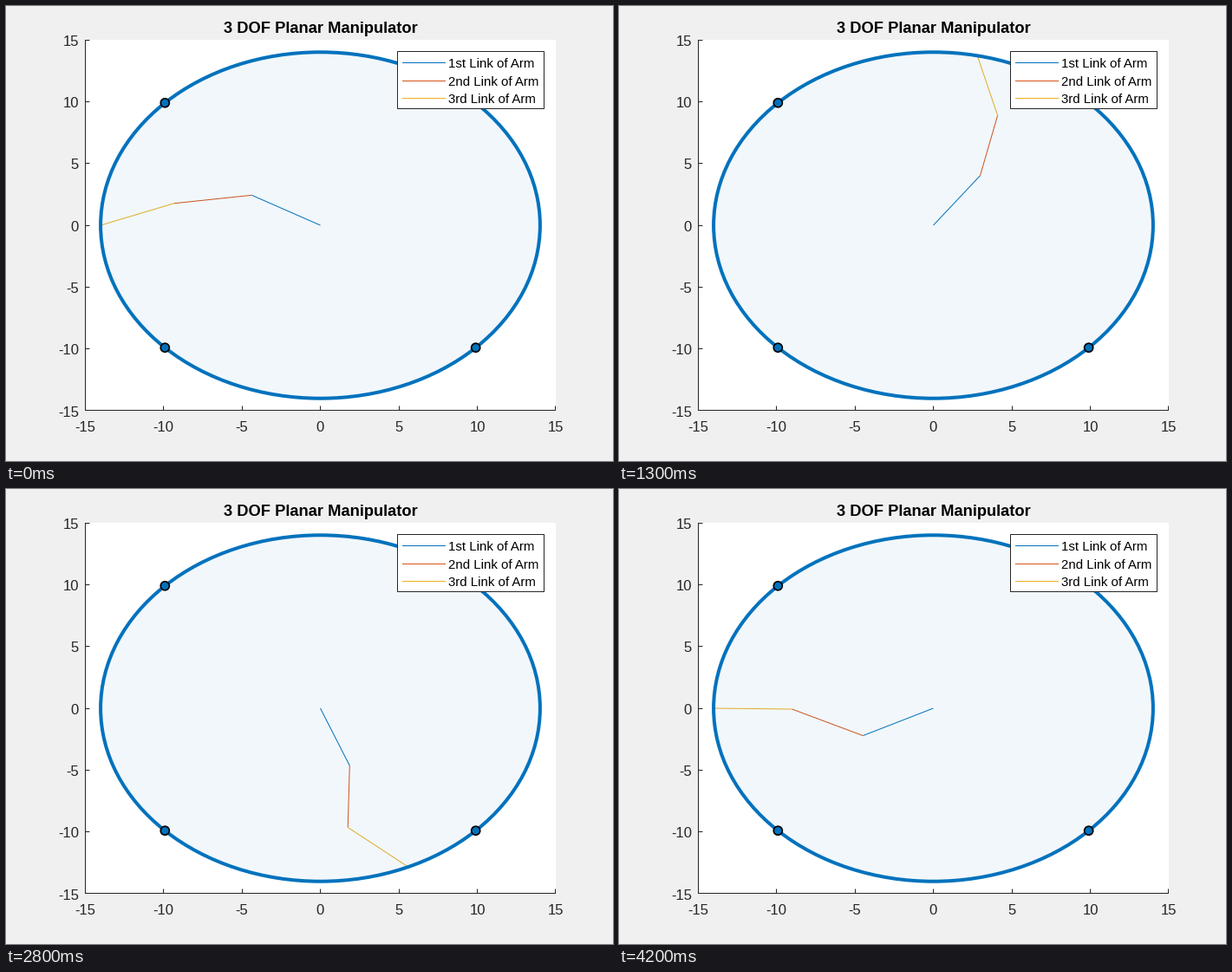
Write a matplotlib script that moves like this. It is 700 px wide and 525 px high and loops after 4.3 s.

```python
import math

import numpy as np
import matplotlib.pyplot as plt
from matplotlib.animation import FuncAnimation
from matplotlib.patches import Ellipse, Rectangle

W, H, DPI = 700, 525, 100
PX = 72 / DPI  # one pixel in points
LEFT, TOP, RIGHT, BOTTOM = 91, 39, 634, 467  # plot area
LIMIT = 15
BLUE, ORANGE, YELLOW = "#0072BD", "#D95319", "#EDB120"
COLORS = (BLUE, ORANGE, YELLOW)
INK = "#262626"
LINK, REACH = 5, 14
STEPS = 21  # poses on each half of the circle

plt.rcParams["font.family"] = "Liberation Sans"
plt.rcParams["path.snap"] = False
fig = plt.figure(figsize=(W / DPI, H / DPI), dpi=DPI, facecolor="#F0F0F0")
ax = fig.add_axes([0, 0, 1, 1])
ax.set_xlim(0, W)
ax.set_ylim(H, 0)
ax.axis("off")


def px(x):
    return LEFT + (x + LIMIT) * (RIGHT - LEFT) / (2 * LIMIT)


def py(y):
    return TOP + (LIMIT - y) * (BOTTOM - TOP) / (2 * LIMIT)


def mid(v):
    """Centre of the pixel that holds v."""
    return math.floor(v + 1e-6) + 0.5


def line(xs, ys, color, z):
    return ax.plot(xs, ys, color=color, lw=PX, zorder=z,
                   solid_capstyle="butt")[0]


def oval(x, y, w, h, z, **style):
    ax.add_patch(Ellipse((px(x), py(y)), w, h, zorder=z, **style))


def text(x, y, s, size, ha="left", color="black", weight="normal"):
    ax.text(x, y, s, fontsize=size * PX, ha=ha, va="baseline",
            color=color, weight=weight, zorder=9)


# Arm shape (degrees) as a function of the angle travelled by the tip
TRAVEL = np.array([0, 78.5, 126.9, 180, 246.4, 293.6, 360])
SHAPE = np.array([45.3, 32.3, 21.0, 3.9, -26.7, -58.0, -91.6])
SLOPE = np.array([-0.13, -0.2, -0.27, -0.39, -0.57, -0.64, -0.40])


def shape_at(s):
    """Cubic Hermite interpolation of the arm shape."""
    i = min(np.searchsorted(TRAVEL, s, side="right") - 1, len(TRAVEL) - 2)
    h = TRAVEL[i + 1] - TRAVEL[i]
    u = (s - TRAVEL[i]) / h
    v = 1 - u
    return (v * v * (1 + 2 * u) * SHAPE[i] + u * u * (1 + 2 * v) * SHAPE[i + 1]
            + h * u * v * (v * SLOPE[i] - u * SLOPE[i + 1]))


def pose(k):
    """Joint positions as complex numbers, base first."""
    half, i = divmod(k, STEPS)
    travel = 180 * half + np.degrees(np.arccos(1 - i / 10))
    wave = np.cos(np.radians(shape_at(travel) + np.array([120, -120, 0])))
    bend = 0.53
    for _ in range(8):  # bend the arm until it spans the radius
        span = abs(np.exp(1j * bend * wave).sum())
        bend *= np.sqrt((3 - REACH / LINK) / (3 - span))
    joints = LINK * np.cumsum(np.exp(1j * bend * wave))
    tip = np.exp(1j * np.radians(180 - travel))
    joints *= tip * abs(joints[-1]) / joints[-1]
    return np.concatenate([[0], joints])


# Plot area, axes and labels
ax.add_patch(Rectangle((LEFT, TOP), RIGHT - LEFT, BOTTOM - TOP, fc="white",
                       ec="none", zorder=0))
x0, y0 = mid(LEFT), mid(BOTTOM - 1)
line([LEFT, RIGHT], [y0, y0], INK, 6)
line([x0, x0], [TOP, BOTTOM], INK, 6)
for v in range(-LIMIT, LIMIT + 1, 5):
    x, y = mid(min(px(v), RIGHT - 1)), mid(min(py(v), BOTTOM - 1))
    line([x, x], [y0 - 5, y0], INK, 6)
    line([x0, x0 + 5], [y, y], INK, 6)
    text(px(v), 491, str(v), 16.67, "center", INK)
    text(84, py(v) + 6.6, str(v), 16.67, "right", INK)
text(363, 31, "3 DOF Planar Manipulator", 18.33, "center", weight="bold")

# Workspace circle with its handles
size = (px(REACH) - px(-REACH), py(-REACH) - py(REACH))
oval(0, 0, *size, 4, fc=BLUE, ec="none", alpha=0.05)
oval(0, 0, *size, 5, fc="none", ec=BLUE, lw=4 * PX)
d = REACH / np.sqrt(2)
for x, y in ((-d, d), (-d, -d), (d, -d)):
    oval(x, y, 10, 10, 5.5, fc=BLUE, ec="black", lw=1.7 * PX)

# Legend
ax.add_patch(Rectangle((451.5, 52.5), 169, 66, fc="white", ec=INK, lw=PX,
                       zorder=7))
for n, (name, color) in enumerate(zip(("1st", "2nd", "3rd"), COLORS)):
    y = mid(65.5 + 20.5 * n)
    line([457, 507], [y, y], color, 8)
    text(510, y + 5.5, name + " Link of Arm", 15)

links = [line([], [], c, 2 + 0.1 * n) for n, c in enumerate(COLORS)]


def update(frame):
    p = pose(max(0, frame - 1))
    for n, link in enumerate(links):
        seg = p[n:n + 2]
        link.set_data(px(seg.real), py(seg.imag))
    return links


anim = FuncAnimation(fig, update, frames=2 * STEPS + 1, interval=100,
                     repeat=True, repeat_delay=0, blit=False)
plt.show()
```
